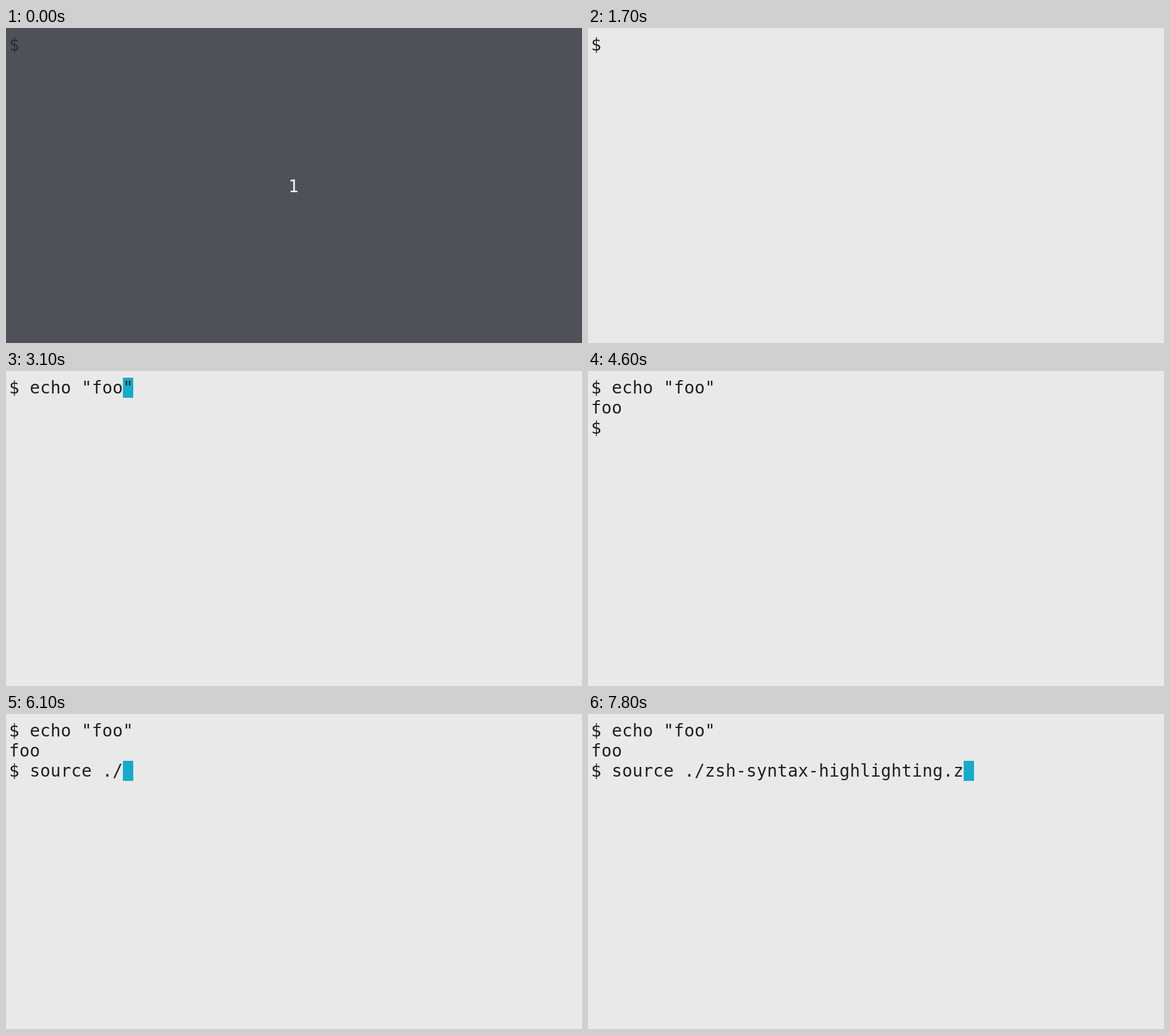
These frames come from a looping animation (946 px wide and 518 px high, 8000 ms). An HTML page:

```html
<!DOCTYPE html>
<html lang="en">
<head>
<meta charset="utf-8">
<title>Terminal session</title>
<style>
  html, body { margin: 0; width: 100%; height: 100%; overflow: hidden; background: #e9e9e9; }
  svg { display: block; width: 100vw; height: 100vh; }
  text {
    font: 28px "DejaVu Sans Mono", monospace;
    letter-spacing: 0.143px;
    fill: #1f1f1f;
    white-space: pre;
  }
  #cover text { fill: #292b2e; }
  #cover .count { fill: #f4f4f4; text-anchor: middle; }
</style>
</head>
<body>
<svg viewBox="0 0 946 518">
  <rect width="946" height="518" fill="#e9e9e9"/>
  <rect id="cursor" width="17" height="33" fill="#14acc9"/>
  <text x="5" y="37"></text>
  <text x="5" y="70"></text>
  <text x="5" y="103"></text>
  <g id="cover">
    <rect width="946" height="518" fill="#4e5157"/>
    <text x="5" y="37">$</text>
    <text class="count" x="472.3" y="270">1</text>
  </g>
</svg>
<script>
const LOOP = 8000, TICK = 100, BLINK = 500;
const CELL = 17, LINE = 33, LEFT = 5, TOP = 11;
const REVEAL = 100, ENTER = 4100;
const PROMPT = '$ ';

// Keystrokes on a tape: each bar lets one tick pass
const first = {
  row: 0, blinkFrom: 200, start: 1800,
  tape: 'e|||cho|| |||"||f|o||o"'.split('|')
};
const second = {
  row: 2, blinkFrom: ENTER, start: 5100,
  tape: '|so|ur||c|e||| |.|/|||||z||s|||||||h-syntax-highlighting|.||z'.split('|')
};

const lines = document.querySelectorAll('svg > text');
const cursor = document.getElementById('cursor');
const cover = document.getElementById('cover');

function typedAt(command, t) {
  const ticks = Math.floor((t - command.start) / TICK) + 1;
  return command.tape.slice(0, Math.max(0, ticks)).join('');
}

function show(el, visible) {
  el.style.display = visible ? '' : 'none';
}

function draw(t) {
  const command = t < ENTER ? first : second;
  const typed = typedAt(command, t);
  const current = PROMPT + typed;
  const content = command === first
    ? [current, '', '']
    : [PROMPT + first.tape.join(''), 'foo', current];
  lines.forEach((line, i) => { line.textContent = content[i]; });

  // The cursor rests on the closing quote until just before Enter
  const onQuote = typed.endsWith('o"') && t < ENTER - TICK;
  const col = current.length - (onQuote ? 1 : 0);
  cursor.setAttribute('x', LEFT + col * CELL);
  cursor.setAttribute('y', TOP + command.row * LINE);

  // It blinks only while the prompt is empty
  const idle = Math.max(0, t - command.blinkFrom);
  show(cursor, typed || Math.floor(idle / BLINK) % 2 === 0);
  show(cover, t < REVEAL);
}

const start = performance.now();
function tick() {
  draw((performance.now() - start) % LOOP);
  requestAnimationFrame(tick);
}
tick();
</script>
</body>
</html>
```
